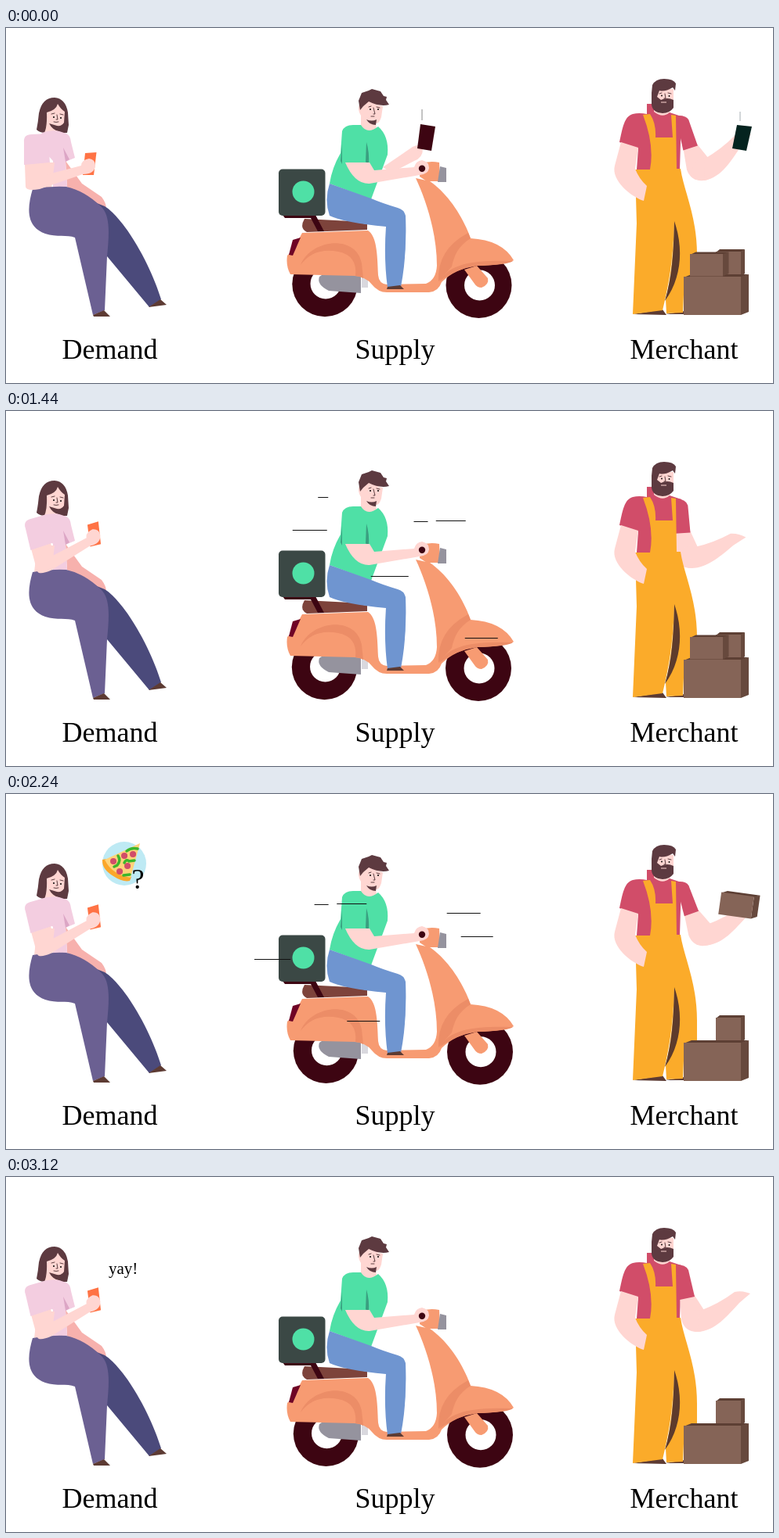
These frames come from a looping animation (979x454 px, 3360 ms). An HTML page:

```html
<!DOCTYPE html>
<html lang="en">
<head>
<meta charset="utf-8">
<title>Demand, Supply, Merchant</title>
<style>
html, body { margin: 0; width: 100%; height: 100%; overflow: hidden; background: #fff; }
svg { display: block; width: 100vw; height: 100vh; }
text { font: 21px "Liberation Serif", "Times New Roman", serif; }
.label { font-size: 36px; }
.skin { fill: #ffd6d2; }
.hair { fill: #5d3a40; }
.shoe { fill: #5d3b33; }
.wine { fill: #3d0512; }
.red { fill: #d14d69; }
.pink { fill: #f3cde0; }
.overall { fill: #fbab2a; }
.body { fill: #f79b72; }
.shade { fill: #ec8d67; }
.steel { fill: #95939e; }
.green { fill: #4fe0a6; }
.ink { fill: none; stroke: #33191e; stroke-width: .8; stroke-linecap: round; }
</style>
</head>
<body>
<svg viewBox="0 0 979 454">
  <defs><clipPath id="road"><rect x="317" y="60" width="355" height="320"/></clipPath></defs>

  <g id="customer">
    <path class="hair" d="M39 130Q41 120 42 109Q46 89 62 89Q76 90 79 108L80 124L78 134Q66 135 58 130L50 134Q43 134 39 130Z"/>
    <path class="skin" d="M52 108Q64 105 66 97Q70 104 75 107L74 121Q71 126 65 125L55 122Q59 130 67 132V138H46Q53 132 52 108Z"/>
    <path class="ink" d="M58 110L62 109M69 110L73 111M65 111L66 117L64 117M61 120Q64 121 67 120"/>
    <circle cx="61" cy="114" r="1"/><circle cx="70" cy="115" r="1"/>
    <path fill="#f7b1ad" d="M76 170L97 199L122 216Q128 224 128 231L112 224L78 203Z"/>
    <path class="pink" d="M46 134Q56 130 68 132L77 135Q82 137 83 146L88 166L76 171L78 203L60 206V170L40 148Z"/>
    <path class="skin" d="M40 172H62L58 206H36Z"/>
    <path fill="#dca6c5" d="M73 153L81 168L76 171Z"/>
    <path fill="#4b4a7b" d="M109 222Q127 226 136 236C165 265 189 317 198 347L183 357L129 292Z"/>
    <path fill="#6b6092" d="M34 206C27 230 25 254 50 263C65 268 78 264 88 268L111 367L126 361L129 292C132 262 133 239 121 228Q100 208 77 203Q55 202 34 206Z"/>
    <path class="shoe" d="M111 367L125 361L133 369H112ZM182 357L197 347L205 354Z"/>
    <g id="armC">
      <path fill="#ff7345" d="M101 160L115.500 159L112 188H98Z"/>
      <path class="skin" d="M24 174L25 203Q26 209 43 206L98 187Q113 187 114 176Q114 168 106 167Q96 169 96 176L50 188V170Z"/>
      <path class="pink" d="M23 146Q22 136 33 136L53 135L56 172L23 175Z"/>
    </g>
  </g>

  <g id="wheels" class="wine">
    <circle cx="407" cy="327.500" r="41.700"/><circle cx="603.500" cy="329" r="42"/>
    <g fill="#fff"><circle cx="408" cy="327" r="19.500"/><circle cx="604.500" cy="329" r="19.500"/></g>
  </g>
  <g id="ride">
    <path fill="#d9d8de" d="M454 319H462V332H454Z"/>
    <path class="steel" d="M403 316H453V339L412 336Q396 328 400 318Z"/>
    <path class="body" d="M378 262L462 259C473 266 474 288 475 316Q476 327 486 328L536 327Q549 322 550 304C550 262 536 220 523 192L541 196C563 211 583 240 593 269Q633 271 648 297Q640 303 600 304Q573 308 556 325Q552 337 540 338H486Q475 338 467 328Q459 318 445 317L363 315Q357 304 359 291Q364 287 369 279Z"/>
    <path class="shade" d="M376 303C389 270 447 263 454 301L456 320Q451 317 446 317Q449 291 424 286Q393 280 376 303Z"/>
    <path class="shade" d="M590 262L593 269C577 279 572 291 569 305L552 324Q550 283 590 262Z"/>
    <path class="shade" d="M553 324C568 299 602 297 647 298Q640 303 602 304Q574 308 553 324Z"/>
    <path class="body" d="M585 309L601 304L615 320Q617 328 607 332Q601 332 598 327Z"/>
    <path fill="#6f0426" d="M366 271L376 268L366 291L361 290Z"/>
    <path fill="#7d433b" d="M381 244L440 247L461 251V258L384 261Q374 256 381 244Z"/>
    <path class="wine" d="M353 239H395L406 260H398L389 243H356Z"/>
    <rect x="348" y="180.500" width="59.500" height="59.500" rx="5" fill="#3b4845"/>
    <circle class="green" cx="379.500" cy="209.500" r="14"/>
    <path class="body" d="M529 174Q540 169 553 172L554 196H537L528 190Z"/>
    <path class="steel" d="M554 177L562 179V197H551Z"/>

    <g id="call">
      <path class="skin" d="M481 178L519 152Q530 147 532 155Q532 166 521 170L492 185Z"/>
      <path id="handset" class="wine" d="M529 123L548 126L543 157L525 154Z"/>
    </g>
    <path class="skin" d="M451 97L461 90Q471 98 481 100L479 114Q476 123 472 122L473 128Q466 137 453 128L453 112Q448 104 451 97Z"/>
    <path class="hair" d="M452 105L450 93L454 83L463 80L467 78L478 81L482 87L486 88L485 92L489 98Q477 101 463 94L456 100ZM460 117Q467 120 473 117L472 124Q464 124 460 117Z"/>
    <path class="ink" d="M463 101L466 100M473 101L477 102M469 102L471 110L469 110M466 113L470 113"/>
    <circle cx="465" cy="104" r="1"/><circle cx="475" cy="104" r="1"/>
    <path class="green" d="M429 132Q432 124 443 124L453 124Q461 137 475 126Q489 138 487 162L466 219L413 199Q416 179 427 160Z"/>
    <path fill="#3a9f80" d="M429 148L429 174L427 170ZM460 146Q464 158 463 176L459 171Z"/>
    <path fill="#6f95d0" d="M413 199Q406 220 413 240Q432 249 485 254Q482 295 487 332L504 331Q512 290 510 240Q508 232 500 230Q480 224 466 218Z"/>
    <path class="shoe" d="M487 331L503 329L508 334H486Z"/>
    <path class="skin" d="M433 172H464L470 182L521 178Q523 170 531 169Q540 171 540 179Q539 187 528 188L464 199Q445 200 433 172Z"/>
    <circle class="wine" cx="531" cy="179.800" r="4.200"/>
  </g>
  <g id="lines" clip-path="url(#road)" stroke="#111"></g>

  <g id="seller">
    <path class="shoe" d="M800 366L838 360L843 367ZM842 366L866 362V366Z"/>
    <path class="red" d="M800 110Q808 108 818 110V97H826L830 108H847L862 113L860 181H805L807 154L783 146C787 128 789 113 800 110Z"/>
    <g id="upper">
      <path class="skin" d="M860 150H878L896 178L882 198Q866 198 862 182Z"/>
      <g id="fore">
        <circle class="skin" cx="883" cy="184" r="14"/>
        <path class="skin" d="M882 198C905 198 922 176 936 161L950 149Q940 145 930 147Q910 162 886 171Z"/>
      </g>
      <path class="red" d="M855 112Q868 112 871 119L879 153L860 157Z"/>
    </g>
    <path class="skin" d="M827 100L848 101L847 108Q838 116 827 107Z"/>
    <path class="overall" d="M813 111L822 110Q830 122 829 140H851L849 111L855 112L856 180H861C865 208 882 240 882 290V318H866L864 364L843 365L842 347C849 320 853 275 853 247C852 294 846 329 838 361L800 366L805 250L803 181H822Q828 150 813 111Z"/>
    <path class="skin" d="M785 146L807 153L803 180Q808 193 818 202L814 221C798 216 772 195 777 176Z"/>
    <path fill="#5d3b2c" d="M853 247C864 278 864 318 841 349C851 315 852 284 853 247Z"/>
    <path class="skin" d="M831 78H852V96H831Z"/>
    <path class="hair" d="M824 83L825 73Q829 65 840 65Q852 65 855 71L854 80L851 76Q841 82 834 80L831 88L836 92Q844 88 852 92V102Q847 109 838 109Q825 108 824 98Z"/>
    <path class="ink" d="M834 84L837 83M845 83L849 84M841 84L842 90L840 90"/>
    <circle cx="837" cy="86.500" r=".9"/><circle cx="846.500" cy="87" r=".9"/>
    <path stroke="#ffd6d2" d="M836 95H843"/>
    <path id="tablet" fill="#04231f" d="M933 124L952 126L945 157L927 154Z"/>
  </g>
  <g id="crates"></g>
  <g id="parcel"></g>

  <g id="wish">
    <circle cx="151" cy="89" r="28" fill="#beeaf4"/>
    <g id="slice">
      <path fill="#fba72a" d="M123 82Q122 94 137 103Q149 111 158 109L160 104L128 81Z"/>
      <path fill="#ffd37a" d="M171 61L126 82Q135 101 159 105Z"/>
      <path stroke="#d14d69" stroke-width="8" stroke-linecap="round" d="M137 84h.1M151 77h.1M162 75h.1M145 97h.1M155 90h.1"/>
      <path fill="none" stroke="#3cb62c" stroke-width="3.500" stroke-linecap="round" d="M154 71Q160 66 168 68M143 77Q147 83 142 89L138 91M151 86Q153 81 157 84L164 83M150 102L158 101"/>
    </g>
  </g>
  <text id="ask" class="label" x="160.500" y="121">?</text>
  <g id="placed"><text x="134.500" y="105">Order</text><text x="134.500" y="132">Placed!</text></g>
  <text id="yay" x="131" y="124">yay!</text>

  <text class="label" x="71.500" y="423">Demand</text>
  <text class="label" x="445.500" y="423">Supply</text>
  <text class="label" x="796.500" y="423">Merchant</text>
</svg>
<script>
const LOOP = 3360, STEP = 40;
const $ = id => document.getElementById(id);
const clamp = v => Math.max(0, Math.min(1, v));
const between = (t, a, b) => t >= a && t < b;
const show = (el, on) => el.setAttribute('visibility', on ? 'visible' : 'hidden');
const move = (id, value) => $(id).setAttribute('transform', value);
const scaleAt = (x, y, s) => `translate(${x} ${y}) scale(${s}) translate(${-x} ${-y})`;

// Smooth 0 to 1 while t runs from a to b.
function ramp(t, a, b) {
  const u = clamp((t - a) / (b - a));
  return u * u * (3 - 2 * u);
}

function add(parent, tag, attrs) {
  const el = document.createElementNS('http://www.w3.org/2000/svg', tag);
  for (const k in attrs) el.setAttribute(k, attrs[k]);
  return parent.appendChild(el);
}

function crate(id, x, y, w, h, dx, dy) {
  const face = (fill, d) => add($(id), 'path', { fill, d });
  face('#5d3f34', `M${x} ${y + 1}l${dx} ${-dy - 1}h${w}l${-dx} ${dy + 1}Z`);
  face('#67493d', `M${x + w} ${y}l${dx} ${-dy}v${h - 1}l${-dx} ${dy + 1}Z`);
  face('#856457', `M${x} ${y}h${w}v${h}h${-w}Z`);
}

// Four rays spread around a centre, first one upright.
function fan(cx, cy, inner, outer, stroke) {
  return [0, 1, 2, 3].map(i => {
    const a = i * 14 * Math.PI / 180, s = Math.sin(a), c = Math.cos(a);
    return add(document.querySelector('svg'), 'line', {
      x1: cx + inner * s, y1: cy - inner * c, x2: cx + outer * s, y2: cy - outer * c, stroke
    });
  });
}

crate('crates', 906, 286, 32, 32, 5, 3);
crate('crates', 865, 318, 73, 49, 10, 3);
crate('parcel', 915, 119, 42, 28.5, 7.5, 2.5);
const rider = fan(531, 150, 32, 46, '#4fe0a6');
const seller = fan(937, 151, 32, 44, '#fbab2a');
const sparks = fan(933, 168, 27, 45, '#fbab2a');
seller[0].setAttribute('stroke', '#a5adb2');
sparks[0].setAttribute('stroke', '#a5adb2');

// Streaks drift left; the higher ones set off more slowly.
function streak(y, x, w = 44, from = 1240) {
  const el = add($('lines'), 'line', { x1: 0, x2: w, y1: y + .5, y2: y + .5 });
  const launch = (30 + 36 * clamp((y - 110) / 90)) / 320;
  return t => {
    const slow = Math.max(0, Math.min(t, 1760) - from) * launch;
    const fast = Math.max(0, t - Math.max(from, 1760)) * .176;
    el.setAttribute('transform', `translate(${x - slow - fast} 0)`);
    show(el, between(t, from, 2920));
  };
}
const streaks = [
  streak(110, 417, 13), streak(141, 547, 18), streak(140, 575, 38),
  streak(152, 395), streak(211, 507, 48), streak(290, 627, 42),
  streak(152, 619, 43, 1920), streak(182, 637, 41, 1920),
  streak(244, 670, 42, 2440), streak(294, 668, 42, 2480)
];

function drawRide(t) {
  const bob = clamp(1 + Math.cos((Math.min(t, 2840) - 1440) / 160 * Math.PI));
  const lift = t >= 2920 ? 2 : 2 * bob * clamp((t - 1160) / 80);
  move('ride', `translate(0 ${-lift})`);
  move('wheels', `translate(${2 * ramp(t, 1760, 2240) - .5 * ramp(t, 1200, 1440)} ${.7 * ramp(t, 1440, 1760)})`);
  const away = ramp(t, 1160, 1360);
  move('call', `rotate(${42 * away} 484 182)`);
  move('handset', scaleAt(528, 155, 1 - away));
  show($('call'), away < 1);
  rider.forEach((el, i) => show(el, between(t, i * 80, 1200)));
  rider[0].setAttribute('stroke', t < 40 ? '#888' : '#4fe0a6');
  streaks.forEach(place => place(t));
}

function drawSeller(t) {
  const drop = ramp(t, 1200, 1440), catching = ramp(t, 1440, 1760);
  const tilt = ramp(t, 1760, 2240) - ramp(t, 2240, 2480);
  const raise = ramp(t, 0, 560);
  move('upper', `rotate(${-6 - raise + 15 * drop - 8 * catching - 8 * tilt} 858 115)`);
  move('fore', `rotate(${-3 + 3 * drop + 8 * tilt} 883 184)`);
  move('tablet', `translate(${2 * raise} ${-1.5 * raise}) ` + scaleAt(938, 145, 1 - ramp(t, 1160, 1320)));

  const low = 1 - ramp(t, 1440, 1720), lean = ramp(t, 1760, 2240);
  move('parcel', `translate(${-42 * low - 4 * lean} ${170 * low + 9.5 * lean}) rotate(${8 * lean} 938 133) `
    + scaleAt(938, 133, 1 - ramp(t, 2280, 2440)));
  seller.forEach((el, i) => show(el, between(t, i * 80, 800) || between(t, 920 + i * 40, 1200)));
  sparks.forEach((el, i) => show(el, between(t, 2440 + i * 40, 2800)));
}

function drawThoughts(t) {
  move('wish', scaleAt(151, 89, ramp(t, 1480, 1720)));
  move('slice', `translate(0 ${2 * ramp(t, 1760, 2240)})`);
  show($('wish'), between(t, 1520, 2320));
  show($('ask'), between(t, 2000, 2320));
  show($('placed'), between(t, 2320, 2920));
  show($('yay'), t >= 2920);
}

function render(time) {
  const t = Math.floor((time % LOOP) / STEP) * STEP;
  move('armC', `rotate(${-13.2 * ramp(t, 0, 560)} 40 140)`);
  drawRide(t);
  drawSeller(t);
  drawThoughts(t);
}

const start = performance.now();
function tick() {
  render(performance.now() - start);
  requestAnimationFrame(tick);
}
tick();
</script>
</body>
</html>
```
